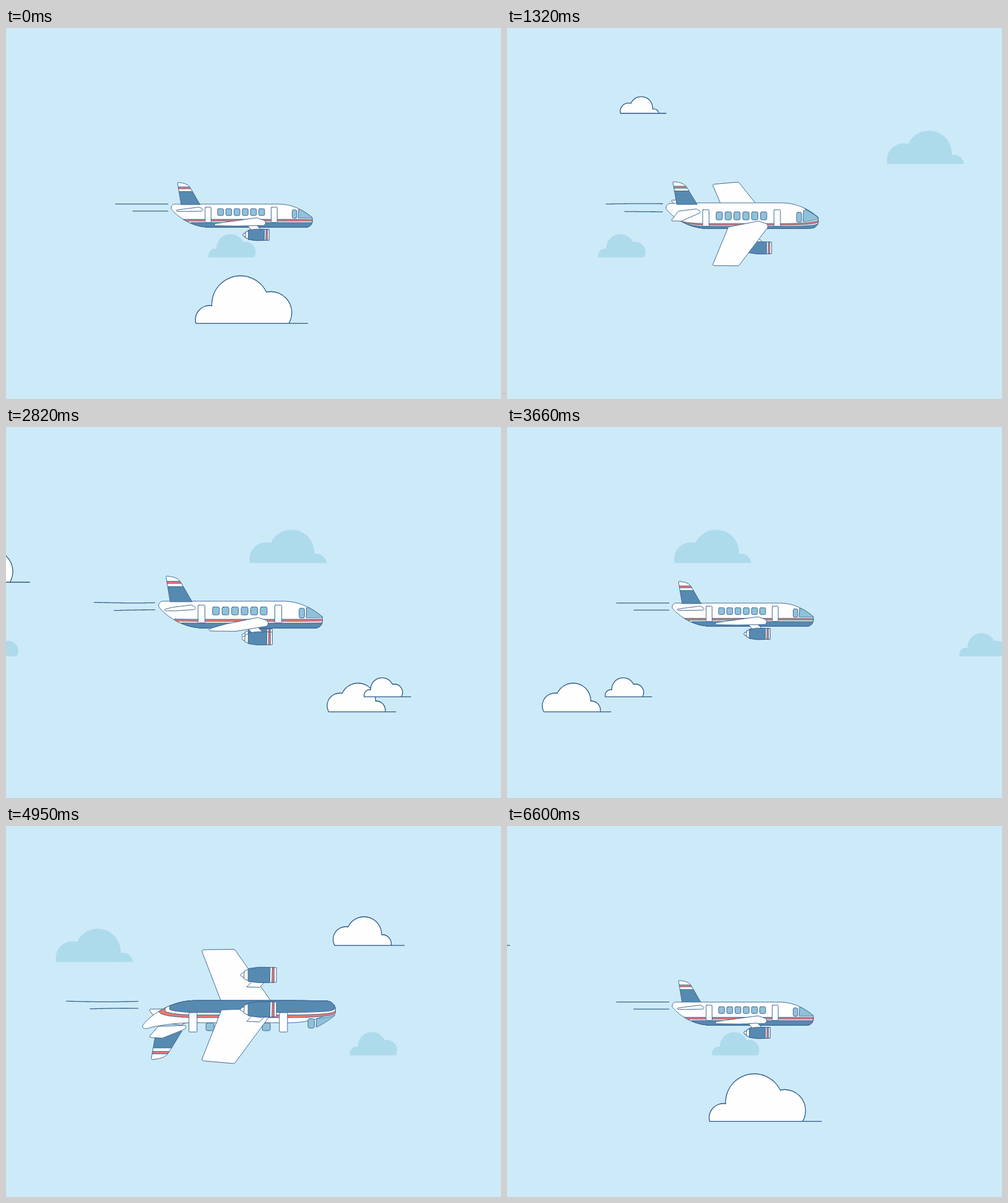
An HTML page with a canvas for the animation above (6.63 s loop, 800x600 px).

```html
<!DOCTYPE html>
<html lang="en">
<head>
<meta charset="utf-8">
<title>Flying plane</title>
<style>
  html, body { margin: 0; width: 100%; height: 100%; overflow: hidden; background: #cdeaf8; }
  canvas { display: block; }
</style>
</head>
<body>
<canvas id="stage" width="800" height="600"></canvas>
<script>
const ctx = document.getElementById('stage').getContext('2d');
const LOOP = 6630, STEP = 30, HALF = Math.PI / 2;
const SKY = '#cdeaf8', PALE = '#aedbeb', BLUE = '#568ab1', GLASS = '#8fc2da',
      RED = '#ee786e', INK = '#3c638f', CLOUD_INK = '#2d5a86', WHITE = '#fefefe';

// ---------- timing ----------
const clamp = (v, lo, hi) => Math.max(lo, Math.min(hi, v));
const sine = u => (1 - Math.cos(Math.PI * u)) / 2;
const cubic = u => u < 0.5 ? 4 * u ** 3 : 1 - 4 * (1 - u) ** 3;

function track(keys, t, ease) {
  if (t <= keys[0][0]) return keys[0][1];
  for (let i = 1; i < keys.length; i++) {
    const [t0, a] = keys[i - 1], [t1, b] = keys[i];
    if (t < t1) return a + (b - a) * ease((t - t0) / (t1 - t0));
  }
  return keys[keys.length - 1][1];
}
const ZOOM = [[770, 1], [2250, 1.259], [3600, 1], [4000, 1], [4900, 1.37], [5790, 1]];
const ROCK = [[500, 0], [1500, 19.9], [2070, -21.8], [2820, 2], [3300, 0]];
const BARREL = [[4000, 0], [5830, 360]];

// ---------- clouds ----------
// Bumps are [x, height above base, radius], measured from the lower left corner.
const BIG = [[23, 6, 23], [73, 30.5, 46.5], [122, 17.5, 34]];
const LONG = [[27, 6.5, 27], [68, 17, 37], [108, -2, 17]];
const ROUND = [[20.5, 10, 20.5], [50, 18, 28.5], [79.5, 3, 14.5]];

// shape, size, base y, x at time, time, speed, right end of base line (0: pale, no line)
const CLOUDS = [
  [BIG, 0.49, 371, 351, 6454, 0.13605, 0],
  [LONG, 1, 220, 320.7, 3315, 0.147, 0],
  [LONG, 0.5, 138, 183, 1320, 0.55, 74],
  [BIG, 0.52, 251, 217, 2250, 0.684, 92],
  [BIG, 1, 251, 245, 2250, 0.684, 183],
  [ROUND, 1, 460.7, 519, 2820, 0.55, 111],
  [BIG, 0.4, 436.3, 578.6, 2820, 0.5, 75.5],
  [ROUND, 1, 193.2, 331, 5460, 0.3875, 115],
  [BIG, 1, 477.7, 306, 0, 0.688, 181.5]
];

function bumps(shape, size, x, y, grow, color) {
  ctx.fillStyle = color;
  for (const [bx, up, r] of shape) {
    ctx.beginPath();
    ctx.arc(x + bx * size, y - up * size, r * size + grow, 0, 7);
    ctx.fill();
  }
}

function cloud([shape, size, y, x0, t0, speed, tail], t) {
  const dt = (t - t0 + 1.5 * LOOP) % LOOP - LOOP / 2;
  const x = x0 - speed * dt;
  if (x > 810 || x < -260) return;
  ctx.save();
  ctx.beginPath();
  ctx.rect(x - 5, 0, 300, y);
  ctx.clip();
  if (tail) bumps(shape, size, x, y, 0.6, CLOUD_INK);
  bumps(shape, size, x, y, tail ? -0.7 : 0, tail ? WHITE : PALE);
  ctx.restore();
  if (!tail) return;
  const [bx, up, r] = shape[0];
  const start = x + size * (bx - Math.sqrt(r * r - up * up));
  ctx.strokeStyle = CLOUD_INK;
  ctx.lineWidth = 1.3;
  ctx.beginPath();
  ctx.moveTo(start, y);
  ctx.lineTo(x + tail, y);
  ctx.stroke();
}

// ---------- plane: solid body rolled about its long axis ----------
// The cross-section is a rounded square: WIDE sets its outline, DEEP carries the markings.
const CX = 393, CY = 304, AXIS = 305.5, WIDE = 1.25, DEEP = 1.07;
let zoom = 1, sin = 0, cos = 1, swell = 1, turn = 0;

const sx = x => CX + (x - CX) * zoom;
const sy = (y, z = 0) => CY + (AXIS - CY + (y - AXIS) * cos + z * sin) * zoom;

function paint(fill, width = 0.95) {
  ctx.fillStyle = fill;
  ctx.fill();
  ctx.strokeStyle = INK;
  ctx.lineWidth = width;
  ctx.stroke();
}

function poly(pts, fill) {
  if (pts.length < 3) return;
  ctx.beginPath();
  for (const [x, y] of pts) ctx.lineTo(x, y);
  ctx.closePath();
  paint(fill);
}

function roofAt(x) {
  if (x < 273) return 291 - 6.2 * Math.sqrt(1 - ((273 - x) / 6) ** 2);
  return x < 440 ? 284.8 : 284.8 + 21.7 * ((x - 440) / 55) ** 2.1;
}
function keelAt(x) {
  if (x < 330) return 292 + 30.2 * (1 - ((330 - x) / 63) ** 2) ** 0.85;
  return x < 485 ? 322.2 : 312 + 10.2 * Math.sqrt(Math.max(0, 1 - ((x - 485) / 10) ** 2));
}
function ring(x) {
  const a = roofAt(x), b = keelAt(x);
  return { mid: (a + b) / 2, r: (b - a) / 2 };
}
function angleAt(x, y) {
  const { mid, r } = ring(x);
  return Math.asin(clamp((y - mid) / r, -1, 1));
}

// Visible screen range of the skin at x between two angles around the body.
function span(x, a, b) {
  const { mid, r } = ring(x);
  let m = (a + b) / 2 + turn;
  const h = (b - a) / 2;
  m = Math.atan2(Math.sin(m), Math.cos(m));
  const lo = Math.max(m - h, -HALF), hi = Math.min(m + h, HALF);
  if (hi - lo < 0.01) return null;
  const y = sy(mid), R = r * swell * zoom;
  return [y + R * Math.sin(lo), y + R * Math.sin(hi)];
}

function strip(x0, x1, range, fill) {
  const top = [], low = [], n = 90;
  for (let i = 0; i <= n; i++) {
    const x = x0 + (x1 - x0) * sine(i / n);
    const [a, b] = range(x);
    const s = b > a && span(x, a, b);
    if (!s) continue;
    top.push([sx(x), s[0]]);
    low.unshift([sx(x), s[1]]);
  }
  poly(top.concat(low), fill);
}

function bothSides(a, b, draw) {
  draw(a, b);
  draw(Math.PI - b, Math.PI - a);
}

function pane(x, w, y0, y1, round, fill) {
  const m = x + w / 2;
  bothSides(angleAt(m, y0), angleAt(m, y1), (a, b) => {
    const s = span(m, a, b);
    if (!s) return;
    const h = s[1] - s[0];
    ctx.beginPath();
    ctx.roundRect(sx(x), s[0], w * zoom, h, Math.min(round * zoom, h / 2));
    paint(fill);
  });
}

function body() {
  strip(267, 495, () => [-Math.PI, Math.PI], WHITE);
  for (const [y, color] of [[309.4, RED], [312.2, WHITE], [314.7, BLUE]]) {
    strip(267, 495, x => {
      const a = angleAt(x, y);
      return [a, Math.PI - a];
    }, color);
  }
  for (let i = 0; i < 6; i++) pane(342 + i * 13.3, 9.4, 292.3, 303.2, 1.8, GLASS);
  pane(462.6, 7.4, 294.2, 307.6, 2, GLASS);
  for (const x of [321.8, 428.7]) pane(x, 9.6, 289.8, 314.5, 1, WHITE);
  const upper = x => Math.max(angleAt(x, 293.6), -HALF + 0.07);
  strip(472.6, 494.4, x => [upper(x), angleAt(x, 307.4)], GLASS);
  strip(472.6, 494.4, x => [Math.PI - angleAt(x, 307.4), Math.PI - upper(x)], GLASS);
}

function hull(pts) {
  pts.sort((p, q) => p[0] - q[0] || p[1] - q[1]);
  const half = list => {
    const out = [];
    for (const p of list) {
      while (out.length > 1) {
        const a = out[out.length - 2], b = out[out.length - 1];
        if ((b[0] - a[0]) * (p[1] - a[1]) - (b[1] - a[1]) * (p[0] - a[0]) > 0) break;
        out.pop();
      }
      out.push(p);
    }
    out.pop();
    return out;
  };
  return half(pts).concat(half(pts.slice().reverse()));
}

// Smooth skin stretched over small balls given as [x, y, z, radius].
function skin(balls, side) {
  const pts = [];
  for (const [x, y, z, r] of balls) {
    for (let k = 0; k < 16; k++) {
      const a = k * Math.PI / 8;
      pts.push([sx(x) + r * zoom * Math.cos(a), sy(y, z * side) + r * zoom * Math.sin(a)]);
    }
  }
  poly(hull(pts), WHITE);
}
const WING = [[361, 317, 16, 1], [405, 311, 16, 4], [415, 315, 16, 4.5],
              [339, 318, 188, 1.8], [374, 316.6, 188, 3.6]];
const TAIL = [[286, 294, 10, 1], [312, 291.7, 10, 2], [316, 294, 10, 2.2],
              [276.4, 295.4, 46, 1.1], [290, 295, 46, 1.6]];

function engine(side) {
  const z = 60 * side, y = sy(334.5, z);
  const at = (x, d) => [sx(x), y + d * zoom];
  const box = (x0, x1, d0, d1, fill) =>
    poly([at(x0, -d0), at(x1, -d1), at(x1, d1), at(x0, d0)], fill);
  const strut = [[390, 319.5], [405, 318.8], [413, 327], [397, 327]];
  poly(strut.map(([px, py]) => [sx(px), sy(py, z)]), WHITE);
  ctx.beginPath();
  ctx.ellipse(sx(386.5), y, 3.6 * zoom, 2.7 * zoom, 0, 0, 7);
  paint(WHITE);
  box(387, 392.3, 4.6, 6.8, WHITE);
  ctx.beginPath();
  ctx.moveTo(...at(392, -7.5));
  ctx.quadraticCurveTo(...at(404, -10.2), ...at(417.6, -9));
  ctx.lineTo(...at(417.6, 9));
  ctx.quadraticCurveTo(...at(404, 10.2), ...at(392, 7.5));
  ctx.closePath();
  paint(BLUE);
  box(417.6, 425.2, 9, 8.7, WHITE);
  box(420.1, 422.5, 8.9, 8.8, RED);
}

function wing(side) {
  const parts = [() => engine(side), () => skin(WING, side)];
  if (sin < 0) parts.reverse();
  parts.forEach(draw => draw());
}

function finPath() {
  ctx.beginPath();
  ctx.moveTo(sx(283), sy(285.3));
  ctx.lineTo(sx(277.3), sy(251));
  ctx.quadraticCurveTo(sx(277.2), sy(249.6), sx(279), sy(249.8));
  ctx.bezierCurveTo(sx(289), sy(251), sx(294.5), sy(252.5), sx(298.5), sy(259.5));
  ctx.lineTo(sx(313.4), sy(285.3));
  ctx.closePath();
}

function fin() {
  finPath();
  ctx.fillStyle = WHITE;
  ctx.fill();
  ctx.save();
  ctx.clip();
  const band = (y0, y1, fill) =>
    poly([[sx(270), sy(y0)], [sx(320), sy(y0)], [sx(320), sy(y1)], [sx(270), sy(y1)]], fill);
  band(257, 260, RED);
  band(264.4, 290, BLUE);
  ctx.restore();
  finPath();
  ctx.strokeStyle = INK;
  ctx.lineWidth = 0.95;
  ctx.stroke();
}

function trail(x0, y, t) {
  const a = sx(x0), b = sx(261.7), amp = Math.min(0.6, (zoom - 1) * 4);
  ctx.strokeStyle = '#39668c';
  ctx.lineWidth = 1.3;
  ctx.beginPath();
  for (let i = 0; i <= 24; i++) {
    const x = a + (b - a) * i / 24;
    ctx.lineTo(x, y + amp * Math.sin(x / 26 + t / 150));
  }
  ctx.stroke();
}

function plane(t) {
  const roll = (track(ROCK, t, sine) + track(BARREL, t, cubic)) * Math.PI / 180;
  zoom = track(ZOOM, t, sine);
  sin = Math.sin(roll);
  cos = Math.cos(roll);
  swell = Math.hypot(cos, WIDE * sin);
  turn = Math.atan2(DEEP * sin, cos);

  trail(177, 284.7 - Math.min(0.9, (zoom - 1) * 4), t);
  trail(205, 296.2 + sin * 2.5, t + 300);

  // [draw, height, side offset] of each root, sorted from back to front
  const parts = [
    [body, 0, 0],
    [fin, -20, 0],
    [() => wing(1), 9, 19], [() => wing(-1), 9, -19],
    [() => skin(TAIL, 1), -10, 12], [() => skin(TAIL, -1), -10, -12]
  ];
  const depth = ([, y, z]) => z * cos - y * sin;
  parts.sort((p, q) => depth(p) - depth(q)).forEach(([draw]) => draw());
}

// ---------- loop ----------
function render(now) {
  const t = Math.floor(now % LOOP / STEP) * STEP;
  ctx.fillStyle = SKY;
  ctx.fillRect(0, 0, 800, 600);
  ctx.lineJoin = 'round';
  ctx.lineCap = 'round';
  for (const c of CLOUDS) cloud(c, t);
  plane(t);
}

const begin = performance.now();
function tick() {
  render(performance.now() - begin);
  requestAnimationFrame(tick);
}
tick();
</script>
</body>
</html>
```
